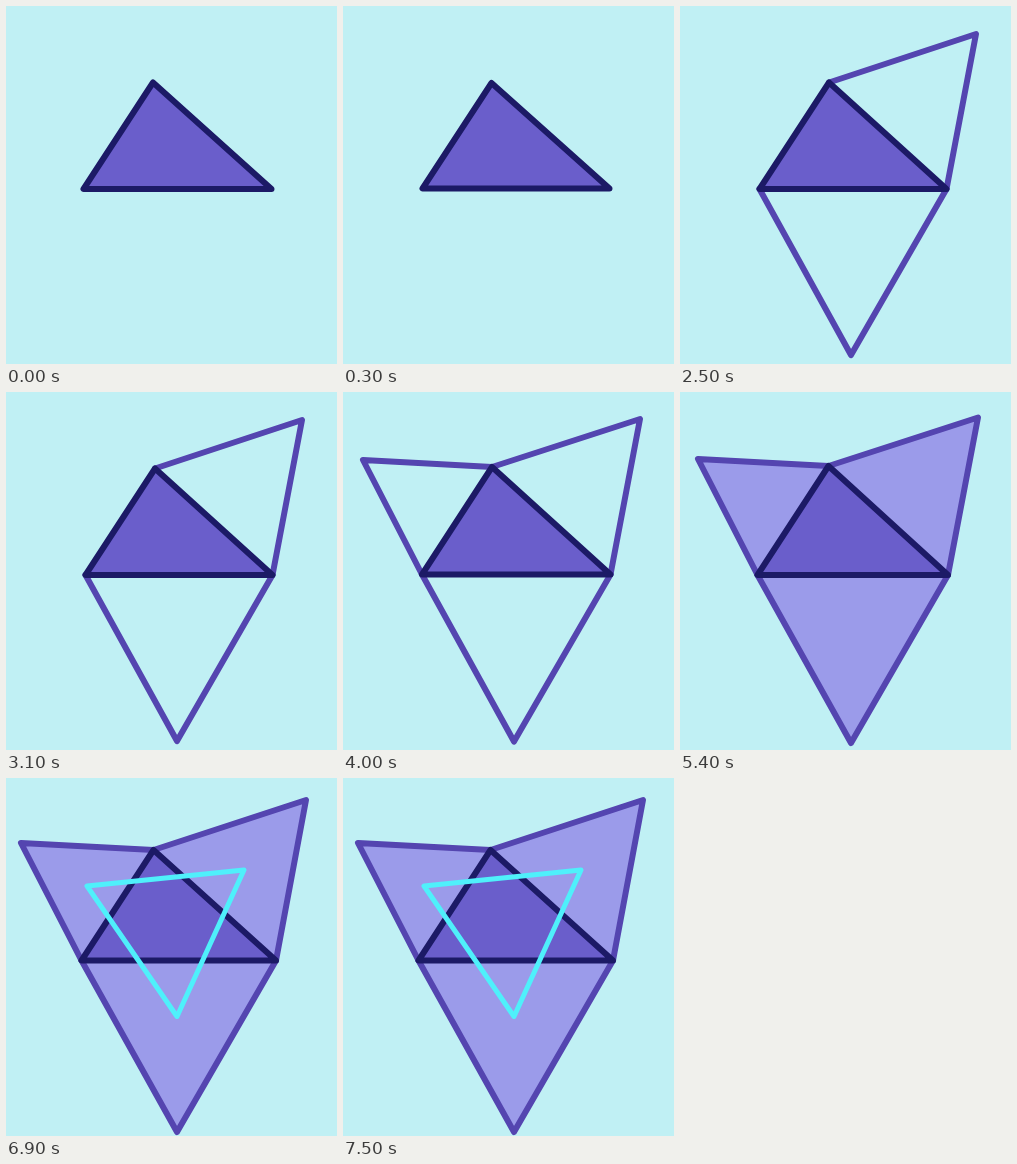
An HTML page with a canvas that plays this animation: 331x358 px, repeating every 8000 ms.

```html
<!DOCTYPE html>
<html lang="en">
<head>
<meta charset="utf-8">
<title>Triangles on the sides of a triangle</title>
<style>
html, body { margin: 0; width: 100%; height: 100%; overflow: hidden; background: #c0f0f4; }
canvas { display: block; width: 331px; height: 358px; }
</style>
</head>
<body>
<canvas id="stage" width="331" height="358"></canvas>
<script>
const LOOP = 8000;
const ctx = document.getElementById('stage').getContext('2d');
const colors = {
  back: '#c0f0f4', core: '#6a5ecb', dark: '#1c1a66',
  edge: '#5445b0', light: '#9b9bea', inner: '#4ff0fb'
};

// Core corners: top, left, right. Outer tips: below, east, west.
const scenes = [
  { at: 0, top: [147, 76.5], left: [77.5, 183], right: [265.5, 183] },
  { at: 1400, top: [148.5, 77], left: [79.5, 182.5], right: [266.5, 182.5], below: [171, 348] },
  { at: 2500, top: [149, 76.5], left: [79.5, 183], right: [266.5, 183], below: [171, 349], east: [296, 28] },
  { at: 3900, top: [149, 75], left: [79, 182.5], right: [267.5, 182.5], below: [171, 349.5], east: [297, 27], west: [20, 68] },
  { at: 5400, top: [148.5, 74], left: [77.5, 183], right: [268, 183], below: [171, 351], east: [298, 25.5], west: [18, 67], filled: true },
  { at: 6900, top: [147.5, 72], left: [75.5, 182.5], right: [270, 182.5], below: [171, 354], east: [300, 22], west: [15, 65], filled: true,
    inner: [[81, 108], [238, 92], [171, 238.5]] }
];

const mix = (a, b, k) => a.map((v, i) => v + (b[i] - v) * k);

function sceneAt(time) {
  const scene = scenes.filter(s => s.at <= time).pop();
  if (scene !== scenes[0]) return scene;
  // The first triangle settles in three short steps.
  const k = Math.min(3, Math.floor(time / 100)) / 3;
  const next = scenes[1];
  return {
    top: mix(scene.top, next.top, k),
    left: mix(scene.left, next.left, k),
    right: mix(scene.right, next.right, k)
  };
}

function shape(points, { fill, stroke, width = 6, closed = true }) {
  ctx.beginPath();
  points.forEach(p => ctx.lineTo(...p));
  if (closed) ctx.closePath();
  if (fill) {
    ctx.fillStyle = fill;
    ctx.fill();
  }
  ctx.strokeStyle = stroke;
  ctx.lineWidth = width;
  ctx.lineJoin = ctx.lineCap = 'round';
  ctx.stroke();
}

function draw(time) {
  const s = sceneAt(time);
  ctx.fillStyle = colors.back;
  ctx.fillRect(0, 0, 331, 358);

  const wing = (from, tip, to) => tip && shape([from, tip, to], {
    fill: s.filled && colors.light, stroke: colors.edge, closed: false
  });
  wing(s.left, s.below, s.right);
  wing(s.top, s.east, s.right);
  wing(s.left, s.west, s.top);

  shape([s.top, s.left, s.right], { fill: colors.core, stroke: colors.dark });
  if (s.inner) shape(s.inner, { stroke: colors.inner, width: 5 });
}

function tick() {
  draw(performance.now() % LOOP);
  requestAnimationFrame(tick);
}
tick();
</script>
</body>
</html>
```
